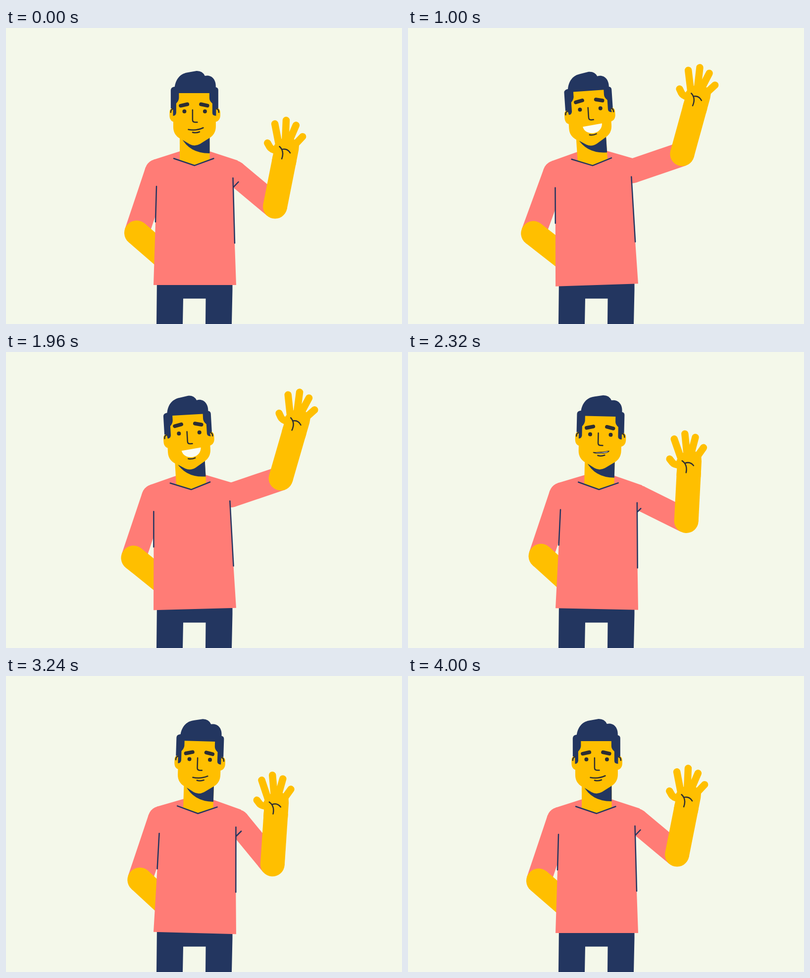
Recreate the animation shown at these times as an HTML page. Size 800 px wide and 600 px high, loop 4040 ms.

```html
<!DOCTYPE html>
<html lang="en">
<head>
<meta charset="utf-8">
<title>Waving man</title>
<style>
  html, body { margin: 0; width: 100%; height: 100%; overflow: hidden; background: #f4f8ea; }
  svg { display: block; width: 100vw; height: 100vh; }
  .skin { fill: #ffbf00; }
  .shirt { fill: #ff7c76; }
  .navy { fill: #233660; }
  .seam, .ink, .limb { fill: none; stroke-linecap: round; stroke-linejoin: round; }
  .seam { stroke: #243560; stroke-width: 2.5; }
  .ink { stroke: #2d2e33; stroke-width: 2.5; }
  .limb { stroke: #ffbf00; stroke-width: 14.5; }
</style>
</head>
<body>
<svg viewBox="0 0 800 600">
  <path class="navy" d="M305 505H457.500V531L456 600H403L403.500 548.500H358L357 600H304Z"/>

  <g id="backUpper" class="shirt">
    <circle r="25"/>
    <rect id="backSleeve" x="-25" width="50"/>
  </g>
  <g id="backFore" class="skin">
    <circle r="25"/>
    <rect y="-25" width="100" height="50"/>
  </g>

  <g id="torso" class="shirt">
    <path d="M351 250H411.500L468 268.500L458.500 304L462 436L465 521H298L302 393L304 321L298 267Z"/>
  </g>

  <g id="upper" class="shirt">
    <circle r="24.600"/>
    <rect id="sleeve" y="-24.600" height="49.200"/>
  </g>
  <g id="fore">
    <circle class="skin" r="24.500"/>
    <rect id="foreBone" class="skin" x="-24.500" width="49"/>
    <g id="hand">
      <path class="skin" d="M-24.500 -90V-108L-26 -121L-22 -130L-13 -138L0 -144L12 -141L23.500 -131L24.500 -122V-90Z"/>
      <path class="limb" d="M-40 -123.500L-34 -116.500Q-30 -112 -18 -112M-33 -164.500L-17.300 -126M-12 -176L-5 -131M9.500 -170L3 -139M27 -150L14.500 -130"/>
      <path class="ink" d="M-14.800 -121.200Q-3 -114 -5.500 -97.700M-8.500 -116.700Q1.500 -121 8.800 -112.700"/>
    </g>
  </g>

  <g id="front">
    <g id="head">
      <path class="skin" d="M351 200H411.500V268L381 279L351 269Z"/>
      <path class="navy" d="M354 222L411.500 215V254Q371 254.500 354 222Z"/>
      <path id="ears" class="skin" d="M342 162Q330.500 160 330.500 171V178Q331 190 342 191ZM420 162Q433 160 433 171V178Q432 190 420 191Z"/>
      <path class="skin" d="M338 125H424V199Q424 215 411 223L392 235Q381 241 371 235.500L357 227Q338 219 338 201Z"/>
      <path id="hair" class="navy"/>
      <path id="earLines" class="ink" d="M333 171Q333 164.500 337.500 164M425.500 164Q430 164.500 430 171"/>
      <g id="features">
        <path id="brows" class="ink" style="stroke-width:7.500" d="M353 157.500L366.500 154.500M394 154.500L407 157.500"/>
        <ellipse id="eyeL" cx="360.500" cy="169" rx="4" fill="#2d2e33"/>
        <ellipse id="eyeR" cx="402" cy="169" rx="4" fill="#2d2e33"/>
        <path class="ink" d="M377 166V186Q377 191 382 191H386.500"/>
        <path id="mouth" class="ink"/>
        <path id="lip" class="ink" d="M377 211.500Q384 213.500 391 210.500"/>
      </g>
    </g>
    <path class="seam" d="M339 264.500L381 278.700L419.500 264.500M304 321L302 393M458.500 304L462 436"/>
    <path id="crease" class="seam"/>
  </g>
</svg>
<script>
const LOOP = 4040, STEP = 40, SPAN = 4000;
const HIP = [381.5, 521];

// Moments when the sway turns round: left, right, left, ...
const TURNS = [530, 1000, 1440, 2050, 2500, 2960, 3380, 3720];

const clamp = x => Math.max(0, Math.min(1, x));
const mix = (a, b, k) => a + (b - a) * k;
const ramp = (t, from, to) => {
  const x = clamp((t - from) / (to - from));
  return x * x * (3 - 2 * x);
};
const hold = (t, a, b, c, d) => ramp(t, a, b) * (1 - ramp(t, c, d));

// Swings between 1 (left) and -1 (right); `rest` is where the loop joins, passed at full speed.
function sway(t, lead, rest) {
  const turns = TURNS.map(x => x - lead);
  const first = turns[0], last = turns[turns.length - 1];
  if (t < first) return mix(rest, 1, Math.sin(t / first * Math.PI / 2));
  if (t > last) return mix(-1, rest, 1 - Math.cos((t - last) / (SPAN - last) * Math.PI / 2));
  const i = Math.max(0, turns.findLastIndex(x => x <= t));
  if (i === turns.length - 1) return -1;
  const side = i % 2 ? -1 : 1;
  return side * (1 - 2 * ramp(t, turns[i], turns[i + 1]));
}

const $ = id => document.getElementById(id);
const set = (id, attrs) => { for (const k in attrs) $(id).setAttribute(k, attrs[k]); };
const move = (id, transform) => set(id, { transform });
const place = (id, [x, y], angle) => move(id, `translate(${x} ${y}) rotate(${angle})`);
const polar = ([x, y], len, deg) => {
  const r = deg * Math.PI / 180;
  return [x + len * Math.cos(r), y + len * Math.sin(r)];
};

function aboutHip(x, y, deg) {
  const r = deg * Math.PI / 180, c = Math.cos(r), s = Math.sin(r);
  const dx = x - HIP[0], dy = y - HIP[1];
  return [HIP[0] + dx * c - dy * s, HIP[1] + dx * s + dy * c];
}

// The outer hair sinks a little and the hairline rises when the man looks up.
function hairPath(up, turn) {
  const o = (x, y) => `${x} ${y + 1.5 * up} `;
  const n = (x, y) => `${x + turn} ${y - 5 * up} `;
  return 'M' + o(333, 163) + 'L' + o(333, 126) + 'Q' + o(333, 120) + o(341, 119)
    + 'C' + o(344, 101) + o(354, 92) + o(368, 90) + 'L' + o(385, 87)
    + 'Q' + o(397, 86.5) + o(402, 97) + 'C' + o(415, 94) + o(425, 104) + o(424, 120)
    + 'Q' + o(429, 121) + o(429, 126) + 'L' + o(429, 163) + 'L' + o(424.5, 163)
    + 'L' + n(424.5, 178) + 'Q' + n(417, 178) + n(417, 172) + 'L' + n(417, 153)
    + 'Q' + n(411, 148) + n(411, 142) + 'L' + n(411, 132) + 'L' + n(349.5, 132)
    + 'L' + n(349.5, 142) + 'Q' + n(349, 148) + n(344, 153) + 'L' + n(344, 172)
    + 'Q' + n(343, 178) + n(337.5, 178) + 'L' + o(337.5, 163) + 'Z';
}

function drawMouth(w, d) {
  const k = clamp(d / 16), cx = 383.5, cy = 204 - 2.2 * k;
  const l = `${cx - w} ${cy + w * .115}`, r = `${cx + w} ${cy - w * .115}`;
  const sag = 5 * (1 - clamp(d / 5));
  const top = `M${l}Q${cx} ${cy + sag} ${r}`;
  const low = cy + d * 1.33;
  const open = d > .5;
  set('mouth', {
    d: open ? `${top}C${cx + w * .95} ${low} ${cx - w * .8} ${low + 1} ${l}Z` : top,
    style: `fill:${open ? '#fbfdf5' : 'none'};stroke-width:${Math.max(0, 2.5 * (1 - d / 6))}`
  });
  move('lip', `translate(${-.5 * k} ${9.5 * Math.max(0, (d - 5) / 11)})`);
}

function drawFace(t, s) {
  const up = hold(t, 0, 480, 2080, 2480);
  const turn = up * (.5 - 1.5 * s);
  const drop = `translate(0 ${1.5 * up})`;
  move('ears', drop);
  move('earLines', drop);
  set('hair', { d: hairPath(up, turn) });
  move('features', `translate(${turn} ${-5 * up})`);
  move('brows', `translate(0 ${-4 * up})`);

  const ry = 4 - 3.2 * clamp(1 - Math.abs(t - 2800) / 120);
  set('eyeL', { ry });
  set('eyeR', { ry });

  const grin = hold(t, 420, 820, 2100, 2400);
  const pucker = hold(t, 200, 560, 560, 820);
  drawMouth(15 + 4.6 * grin - 10.5 * pucker, 16 * grin);
}

function pose(t) {
  const body = sway(t, 0, -.19), wave = sway(t, 50, .3);
  const lift = hold(t, 0, 520, 1960, 2480);
  const dip = Math.sin(Math.PI * clamp((t - 2200) / 1800));
  const shrug = hold(t, 0, 540, 600, 1120);

  const lean = .45 + 2.35 * body;
  const torso = `rotate(${lean} ${HIP})`;
  move('torso', torso);
  move('front', torso);
  move('head', `rotate(${(.4 + 1.5 * lift) * body} 381 265)`);
  drawFace(t, body);

  const backShoulder = aboutHip(305.5, 291, lean);
  const backLen = 131 - 3 * shrug, backAngle = 18.5 + 11.2 * shrug;
  place('backUpper', backShoulder, backAngle);
  set('backSleeve', { height: backLen });
  place('backFore', polar(backShoulder, backLen, backAngle + 90), 41.5 + 2.8 * body - 5 * shrug);

  const shoulder = aboutHip(460.8, 292.6, lean);
  const arm = mix(40 + 11 * dip, -24.3 - 5.7 * wave, lift);
  const stretch = 6 * dip * Math.max(0, wave) * (1 - lift);
  const len = 108 - 1.5 * lift + stretch;
  place('upper', shoulder, arm);
  set('sleeve', { width: len });

  const reach = stretch - 2.5 * wave * lift;
  place('fore', polar(shoulder, len, arm), mix(16, .5, lift) - 16 * wave);
  set('foreBone', { y: -100 - reach, height: 100 + reach });
  move('hand', `translate(0 ${-reach})`);

  const fold = clamp((arm - 10) / 25);
  set('crease', { d: fold ? `M460 322l${9.5 * fold} ${-10 * fold}` : '' });
}

function tick() {
  const t = Math.floor(performance.now() % LOOP / STEP) * STEP;
  pose(Math.min(t, SPAN));
  requestAnimationFrame(tick);
}
tick();
</script>
</body>
</html>
```
